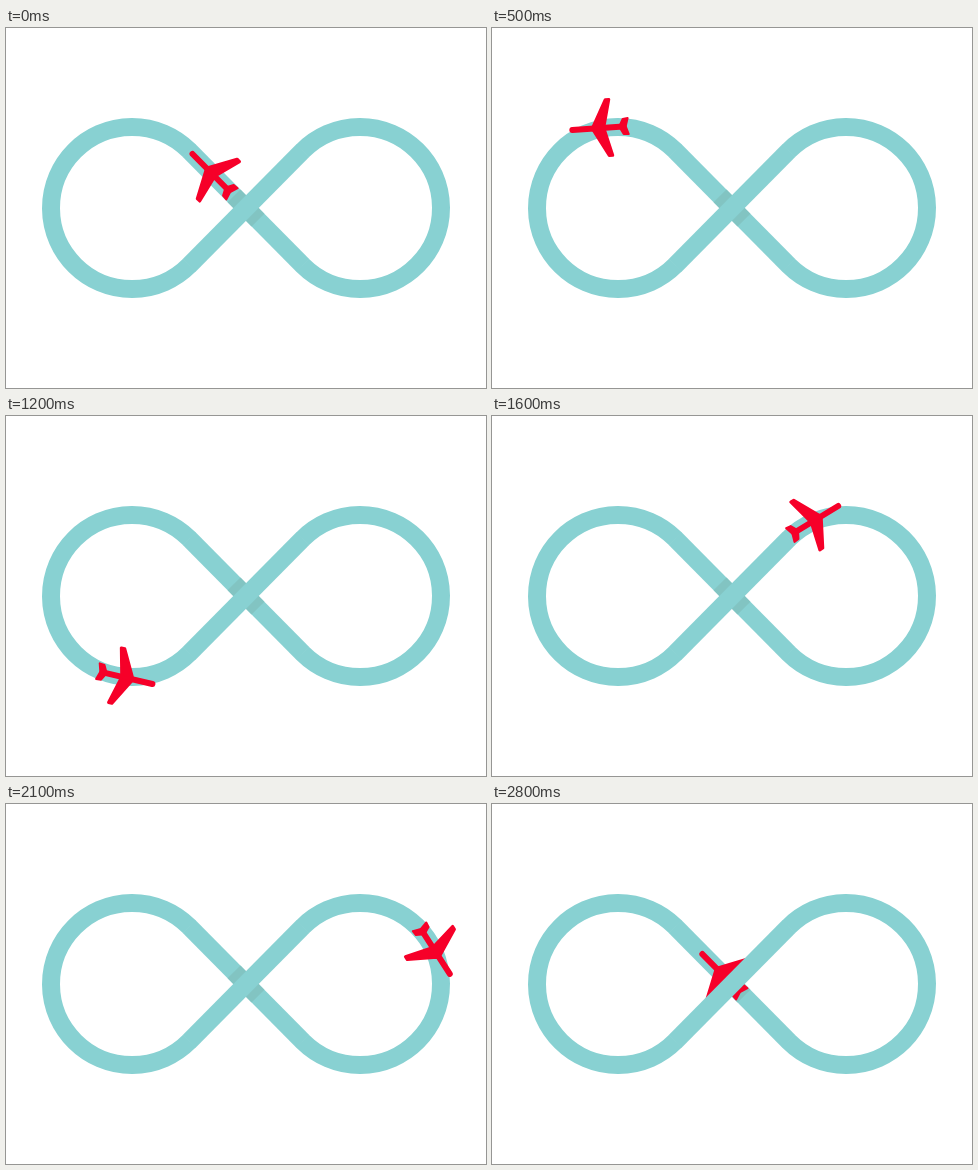
Animation, 480 px wide and 360 px high, one loop 2900 ms. Source, as an HTML page with a canvas:

```html
<!DOCTYPE html>
<html lang="en">
<head>
<meta charset="utf-8">
<title>Endless flight</title>
<style>
  html, body { margin: 0; width: 100%; height: 100%; overflow: hidden; background: #fff; }
  canvas { display: block; width: 480px; height: 360px; }
</style>
</head>
<body>
<canvas id="stage" width="480" height="360"></canvas>
<script>
const ctx = document.getElementById('stage').getContext('2d');
const LOOP = 2900, STEP = 100;
const CX = 240, CY = 180, OFFSET = 114, R = 81, BAND = 18;
const TEAL = '#88d1d2', SHADE = '#82c4c2', RED = '#f60029';

const tilt = Math.acos(R / OFFSET);
const sin = Math.sin(tilt), cos = Math.cos(tilt);
const straight = Math.sqrt(OFFSET * OFFSET - R * R);
const half = 2 * straight + R * (2 * Math.PI - 2 * tilt);
const lap = 2 * half;
const LEAD = 13; // the plane's middle sits ahead of its guide point

// [time in ms, distance along the track]
const knots = [
  [0, 36], [500, 150], [600, 188], [1200, 380], [1600, 643], [1700, 673],
  [1800, 697], [1900, 717], [2400, 868], [2500, 928], [2800, 1088]
];

function knot(i) {
  const n = knots.length, turn = Math.floor(i / n);
  const [t, d] = knots[i - turn * n];
  return [t + turn * LOOP, d + turn * lap];
}

function rate(i) {
  const [a, b] = [knot(i), knot(i + 1)];
  return (b[1] - a[1]) / (b[0] - a[0]);
}

function slope(i) {
  const before = rate(i - 1), after = rate(i);
  return 2 * before * after / (before + after);
}

// Monotone cubic interpolation through the knots
function distanceAt(t) {
  let i = 0;
  while (knot(i + 1)[0] <= t) i++;
  const [t0, d0] = knot(i), [t1, d1] = knot(i + 1);
  const h = t1 - t0, u = (t - t0) / h, v = 1 - u;
  return d0 * (1 + 2 * u) * v * v + d1 * (3 - 2 * u) * u * u
    + h * u * v * (slope(i) * v - slope(i + 1) * u);
}

function poseAt(distance) {
  const s = distance % lap, mirrored = s >= half;
  const u = mirrored ? s - half : s;
  let x, y, dx, dy;
  if (u < straight) {
    [dx, dy] = [-sin, -cos];
    [x, y] = [CX + u * dx, CY + u * dy];
  } else if (u < half - straight) {
    const phi = tilt + (u - straight) / R;
    [dx, dy] = [-Math.sin(phi), -Math.cos(phi)];
    [x, y] = [CX - OFFSET + R * Math.cos(phi), CY - R * Math.sin(phi)];
  } else {
    [dx, dy] = [sin, -cos];
    [x, y] = [CX - (half - u) * dx, CY - (half - u) * dy];
  }
  if (mirrored) { x = 2 * CX - x; dx = -dx; }
  return { x, y, heading: Math.atan2(dy, dx) };
}

function strokeLine(x0, y0, x1, y1, color, width) {
  ctx.strokeStyle = color;
  ctx.lineWidth = width;
  ctx.beginPath();
  ctx.moveTo(x0, y0);
  ctx.lineTo(x1, y1);
  ctx.stroke();
}

// A straight through the crossing: side 1 falls to the right, -1 rises
function diagonal(side, reach, color) {
  const x = reach * sin, y = reach * cos * side;
  strokeLine(CX - x, CY - y, CX + x, CY + y, color, BAND);
}

function drawLoops() {
  ctx.strokeStyle = TEAL;
  ctx.lineWidth = BAND;
  ctx.beginPath();
  ctx.arc(CX - OFFSET, CY, R, tilt, -tilt);
  ctx.stroke();
  ctx.beginPath();
  ctx.arc(CX + OFFSET, CY, R, Math.PI + tilt, Math.PI - tilt);
  ctx.stroke();
  diagonal(1, straight + 0.5, TEAL);
  diagonal(1, 17, SHADE);
}

function roundedShape(points, rim) {
  ctx.lineWidth = rim;
  ctx.beginPath();
  points.forEach(([x, y]) => ctx.lineTo(x, y));
  ctx.closePath();
  ctx.fill();
  ctx.stroke();
}

function drawPlane({ x, y, heading }) {
  ctx.save();
  ctx.translate(x, y);
  ctx.rotate(heading);
  ctx.translate(LEAD, 0);
  ctx.fillStyle = RED;
  ctx.lineCap = ctx.lineJoin = 'round';
  strokeLine(27, 0, -24, 0, RED, 6);
  for (const side of [1, -1]) {
    ctx.save();
    ctx.scale(1, side);
    roundedShape([[8, 0], [6, 2], [-8, 28], [-11.5, 28], [-5, 2], [-4, 0]], 3);
    roundedShape([[-20, 0], [-24, 7.5], [-29, 8], [-26.5, 0]], 2);
    ctx.restore();
  }
  ctx.restore();
}

function draw(now) {
  const t = Math.floor(now % LOOP / STEP) * STEP;
  const distance = distanceAt(t);
  const pose = poseAt(distance);
  const s = distance % lap;
  const under = s < straight || s > lap - straight - LEAD;

  ctx.fillStyle = '#fff';
  ctx.fillRect(0, 0, 480, 360);
  drawLoops();
  if (under) drawPlane(pose);
  diagonal(-1, straight + 0.5, TEAL);
  if (!under) drawPlane(pose);
}

const start = performance.now();
function tick() {
  draw(performance.now() - start);
  requestAnimationFrame(tick);
}
tick();
</script>
</body>
</html>
```
